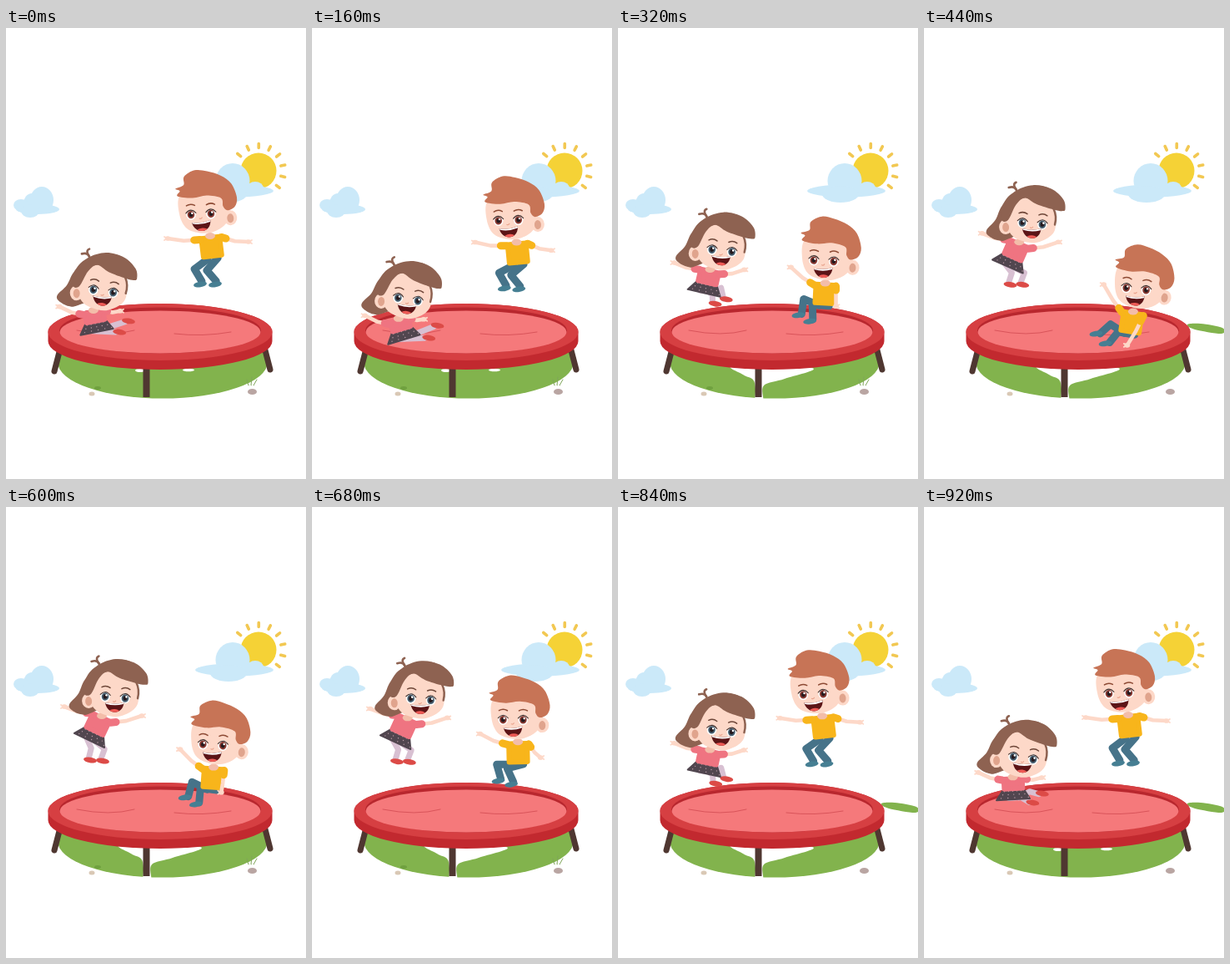
Animation, 360 px wide and 540 px high, one loop 0.96 s. Source, as an HTML page with a canvas:

```html
<!DOCTYPE html>
<html lang="en">
<head>
<meta charset="utf-8">
<title>Trampoline</title>
<style>
html, body { margin: 0; width: 100%; height: 100%; overflow: hidden; background: #fff; }
canvas { display: block; width: 100vw; height: 100vh; }
</style>
</head>
<body>
<canvas id="stage" width="360" height="540"></canvas>
<script>
const ctx = document.getElementById('stage').getContext('2d');
const LOOP = 960, STEP = 40, TAU = Math.PI * 2;
const SKIN = '#fdd8c8', SKY = '#cbe9f9', GRASS = '#82b34d';

// Each child swings between a jumping and a sitting pose.
// Points are measured from between the eyes.
const girl = {
  top: [131, 228], travel: [-17, 104], lowAt: 98, sharpness: 1.7, tilt: 5, lean: 4,
  jump: { neck: [-16, 22], waist: [-25, 41], hands: [[-61, 11], [32, 22]], feet: [[-31, 75], [-16, 76]] },
  sit: { neck: [-11, 23], waist: [-6, 36], hands: [[-51, 20], [18, 24]], feet: [[28, 44], [38, 28]] },
  shirt: '#ef7481', skirt: '#51464f', legs: '#d8c0d2', legWidth: 7,
  shoes: '#dc4b47', bone: 14.5, knee: 1, hipDrop: 10, paintHead: girlHead
};
const boy = {
  top: [234, 223], travel: [21, 91], lowAt: 468, sharpness: 2, tilt: -3, lean: 10,
  jump: { neck: [11, 26], waist: [14, 51], hands: [[-40, 29], [57, 33]], feet: [[0, 84], [18, 84]] },
  sit: { neck: [-4, 27], waist: [-8, 52], hands: [[-39, -6], [-12, 68]], feet: [[-48, 53], [-37, 65]] },
  shirt: '#f8b51b', legs: '#467389', legWidth: 9,
  shoes: '#467f93', bone: 20, knee: -1, hipDrop: 2, paintHead: boyHead
};

const mix = (a, b, u) => [a[0] + (b[0] - a[0]) * u, a[1] + (b[1] - a[1]) * u];

function poseAt(child, t) {
  const swing = (1 + Math.cos(TAU * (t - child.lowAt) / LOOP)) / 2;
  const low = swing ** child.sharpness;
  const { top, travel, jump, sit } = child;
  const head = [top[0] + travel[0] * low, top[1] + travel[1] * low];
  const place = (a, b) => {
    const p = mix(a, b, low);
    return [head[0] + p[0], head[1] + p[1]];
  };
  const pair = name => jump[name].map((p, i) => place(p, sit[name][i]));
  return {
    head, tilt: (child.tilt + child.lean * low) / 360 * TAU,
    neck: place(jump.neck, sit.neck), waist: place(jump.waist, sit.waist),
    hands: pair('hands'), feet: pair('feet')
  };
}

function fill(color) { ctx.fillStyle = color; ctx.fill(); }

function stroke(color, width) {
  ctx.strokeStyle = color;
  ctx.lineWidth = width;
  ctx.lineCap = ctx.lineJoin = 'round';
  ctx.stroke();
}

function oval(color, x, y, rx, ry = rx, turn = 0) {
  ctx.beginPath();
  ctx.ellipse(x, y, rx, ry, turn, 0, TAU);
  fill(color);
}

function line(color, width, ...pts) {
  ctx.beginPath();
  pts.forEach(p => ctx.lineTo(...p));
  stroke(color, width);
}

function arc(color, width, x, y, cx, cy, ex, ey) {
  ctx.beginPath();
  ctx.moveTo(x, y);
  ctx.quadraticCurveTo(cx, cy, ex, ey);
  stroke(color, width);
}

function poly(color, pts, round) {
  ctx.beginPath();
  pts.forEach(p => ctx.lineTo(...p));
  ctx.closePath();
  fill(color);
  stroke(color, round);
}

// Closed smooth shape passing through every point.
function blob(color, ...pts) {
  const n = pts.length, at = i => pts[(i + n) % n];
  ctx.beginPath();
  ctx.moveTo(...pts[0]);
  for (let i = 0; i < n; i++) {
    const [a, b, c, d] = [at(i - 1), at(i), at(i + 1), at(i + 2)];
    ctx.bezierCurveTo(b[0] + (c[0] - a[0]) / 6, b[1] + (c[1] - a[1]) / 6,
      c[0] - (d[0] - b[0]) / 6, c[1] - (d[1] - b[1]) / 6, ...c);
  }
  fill(color);
}

function drawSky() {
  oval('#f5d236', 303, 171, 21.5);
  for (let i = 0; i < 8; i++) {
    const a = (39 - 25.7 * i) / 360 * TAU, c = Math.cos(a), s = Math.sin(a);
    line('#f2c852', 3.6, [303 + c * 27.5, 171 + s * 27.5], [303 + c * 32.5, 171 + s * 32.5]);
  }
  oval(SKY, 274, 195, 47, 7.5);
  oval(SKY, 272, 183, 20.5, 21);
  oval(SKY, 299, 192, 10, 8);
  oval(SKY, 267, 199, 22, 10);
  oval(SKY, 38, 217, 26, 6);
  oval(SKY, 43, 206, 14, 16);
  oval(SKY, 31, 210, 10, 12);
  oval(SKY, 18, 212, 9, 7);
  oval(SKY, 29, 219, 11, 8);
}

function drawGrass(t) {
  const streak = t > 200 && Math.cos(TAU * (t - 440) / 400) > .2;
  oval(GRASS, 188, 400, 126, 43.5);
  if (t >= 240 && t < 860) {
    blob('#fff', [139, 404], [150, 415], [162, 421], [165, 432], [165, 446],
      [174, 446], [175, 428], [200, 420], [233, 407]);
  } else {
    oval('#fff', 161, 410, 6, 2);
    oval('#fff', 219, 409.5, 7, 1.8);
  }
  if (streak) {
    blob(GRASS, [316, 355], [332, 354], [358, 359], [357, 366], [325, 361]);
  } else {
    for (let i = -1; i < 2; i++) line('#7fa65a', 1, [294 + i * 3, 428], [295 + i * 6, 418 + Math.abs(i) * 3]);
    oval('#6fa03f', 110, 431, 4, 2);
  }
  oval('#b9a5a2', 295.5, 435.5, 5.5, 3.6);
  oval('#d9c8b5', 103, 438, 3.5, 2.5);
}

function drawTrampoline() {
  const leg = '#4f3731';
  line(leg, 7, [65, 384], [58, 411]);
  line(leg, 7, [310, 382], [317, 409]);
  ctx.fillStyle = leg;
  ctx.fillRect(164.5, 402, 8, 40);
  ctx.beginPath();
  ctx.ellipse(185, 364, 134.5, 34, 0, Math.PI, 0);
  ctx.ellipse(185, 375, 134.5, 34, 0, 0, Math.PI);
  fill('#c2292f');
  oval('#d63f42', 185, 364, 134.5, 34);
  oval('#b8272e', 185, 362, 121, 27.5);
  oval('#f5797b', 185, 364, 120.5, 25.5);
  arc('#d9545a', 1, 85, 362, 125, 370, 154, 362);
  arc('#d9545a', 1, 202, 366, 236, 370, 270, 364);
}

function drawEye(x, iris, brow) {
  oval('#fff', x, 0, 5.8, 6.2);
  oval(iris, x, 0, 4.3, 4.7);
  oval('#25191d', x, 0, 2.4, 2.7);
  oval('#fff', x + 1.4, -1.8, 1.3);
  arc('#45302c', 1.1, x - 6, -2, x, -9, x + 6, -2);
  arc(brow, 1.5, x - 5, -11, x, -14, x + 5, -11);
}

function drawMouth(y) {
  ctx.save();
  ctx.translate(0, y);
  ctx.beginPath();
  ctx.moveTo(-11.5, -4);
  ctx.quadraticCurveTo(0, -2, 11, -6);
  ctx.bezierCurveTo(11, 10, -8, 11, -11.5, -4);
  fill('#5c1517');
  ctx.clip();
  oval('#ee5a55', 1, 7, 7, 4);
  arc('#fff', 2.4, -10, -3.6, 0, -1.4, 10, -5);
  ctx.restore();
}

function drawFace(iris, brow, mouthY) {
  drawEye(-12, iris, brow);
  drawEye(12, iris, brow);
  arc('#e9a58f', 1.2, -2, 5, 0, 6, 1, 4);
  drawMouth(mouthY);
}

function drawEar(x, y) {
  oval(SKIN, x, y, 8, 9);
  oval('#e0a48d', x, y + .5, 4, 5.5);
}

function girlHead() {
  const hair = '#8e6251';
  ctx.save();
  ctx.rotate(-.12);
  arc(hair, 2.6, -18, -41, -20, -46, -27, -44);
  arc(hair, 2.6, -18, -41, -23, -48, -18, -50);
  blob(hair, [20, -42], [-20, -38], [-36, -22], [-44, -6], [-55, 6],
    [-53, 13], [-41, 19], [-28, 17], [20, -5]);
  blob(SKIN, [-31, -4], [-20, -26], [4, -32], [24, -20], [28, 2], [22, 15], [4, 23], [-14, 20], [-26, 12]);
  drawEar(-32, 3);
  blob(hair, [40, -16], [38, -28], [24, -41], [2, -46], [-20, -39], [-34, -23], [-37, -6],
    [-29, -5], [-19, -23], [-8, -31], [6, -23], [26, -16], [36, -14]);
  arc(hair, 2.5, 26, -17, 30, -8, 27, 2);
  ctx.restore();
  drawFace('#435c6d', '#6d4638', 11);
}

function boyHead() {
  const hair = '#c77456';
  blob(SKIN, [-26, -2], [-24, -24], [0, -34], [28, -24], [35, 0], [28, 14], [13, 22], [-4, 22], [-19, 15]);
  drawEar(35, 6);
  blob(hair, [-27, -23], [-24, -29], [-29, -32], [-19, -36], [-18, -46], [-5, -53], [10, -51],
    [26, -45], [38, -35], [44, -18], [41, -7], [32, -3], [27, -8], [25, -18], [8, -22], [-9, -20]);
  drawFace('#8a3a32', '#8d4a34', 13.5);
}

function drawArm(shoulder, hand, sleeve) {
  const elbow = mix(shoulder, hand, .5);
  elbow[1] += 2;
  const grow = Math.sign(hand[0] - shoulder[0]);
  line(SKIN, 4.6, shoulder, elbow, hand);
  oval(SKIN, hand[0], hand[1], 3.4, 2.8);
  line(SKIN, 1.8, hand, [hand[0] + grow * 4, hand[1] - 2]);
  line(SKIN, 1.8, hand, [hand[0] + grow * 4, hand[1] + 2]);
  line(sleeve, 9, shoulder, mix(shoulder, elbow, .35));
}

// Two equal bones; the child's knee sign picks the bending side.
function drawLeg(child, hip, foot) {
  const dx = foot[0] - hip[0], dy = foot[1] - hip[1], d = Math.hypot(dx, dy);
  const out = Math.sqrt(Math.max(0, child.bone ** 2 - d * d / 4)) * child.knee / d;
  const mid = mix(hip, foot, .5);
  line(child.legs, child.legWidth, hip, [mid[0] + dy * out, mid[1] - dx * out], mix(hip, foot, .88));
  oval(child.shoes, foot[0] + child.knee, foot[1], 8, 3.3, .15 * child.knee);
}

function drawChild(child, t) {
  const { head, tilt, neck, waist, hands, feet } = poseAt(child, t);
  const dx = waist[0] - neck[0], dy = waist[1] - neck[1], d = Math.hypot(dx, dy);
  // Local frame: across the torso, then down the spine.
  const place = (p, across, down) =>
    [p[0] + (dy * across + dx * down) / d, p[1] + (-dx * across + dy * down) / d];
  const sides = [-1, 1];

  for (const i of [1, 0]) drawLeg(child, place(waist, sides[i] * 6, child.hipDrop), feet[i]);
  if (child.skirt) {
    poly(child.skirt, [place(waist, -11, -2), place(waist, 11, -2), place(waist, 19, 12), place(waist, -21, 12)], 2);
    for (let i = 0; i < 15; i++) {
      const row = i % 3, column = Math.floor(i / 3) - 2;
      oval('#b99aa5', ...place(waist, column * (5 + row * 1.6) + row - 1, 2 + row * 4), .7);
    }
  }
  poly(child.shirt, [place(neck, -11, 2), place(neck, 11, 2), place(waist, 11, -1), place(waist, -11, -1)], 6);
  sides.forEach((side, i) => drawArm(place(neck, side * 13, 3), hands[i], child.shirt));
  oval('#f3bda9', ...neck, 6, 4);

  ctx.save();
  ctx.translate(...head);
  ctx.rotate(tilt);
  child.paintHead();
  ctx.restore();
}

function draw(t) {
  ctx.fillStyle = '#fff';
  ctx.fillRect(0, 0, 360, 540);
  drawSky();
  drawGrass(t);
  drawTrampoline();
  drawChild(girl, t);
  drawChild(boy, t);
}

const start = performance.now();
function tick() {
  const t = (performance.now() - start) % LOOP;
  draw(Math.floor(t / STEP) * STEP);
  requestAnimationFrame(tick);
}
tick();
</script>
</body>
</html>
```
